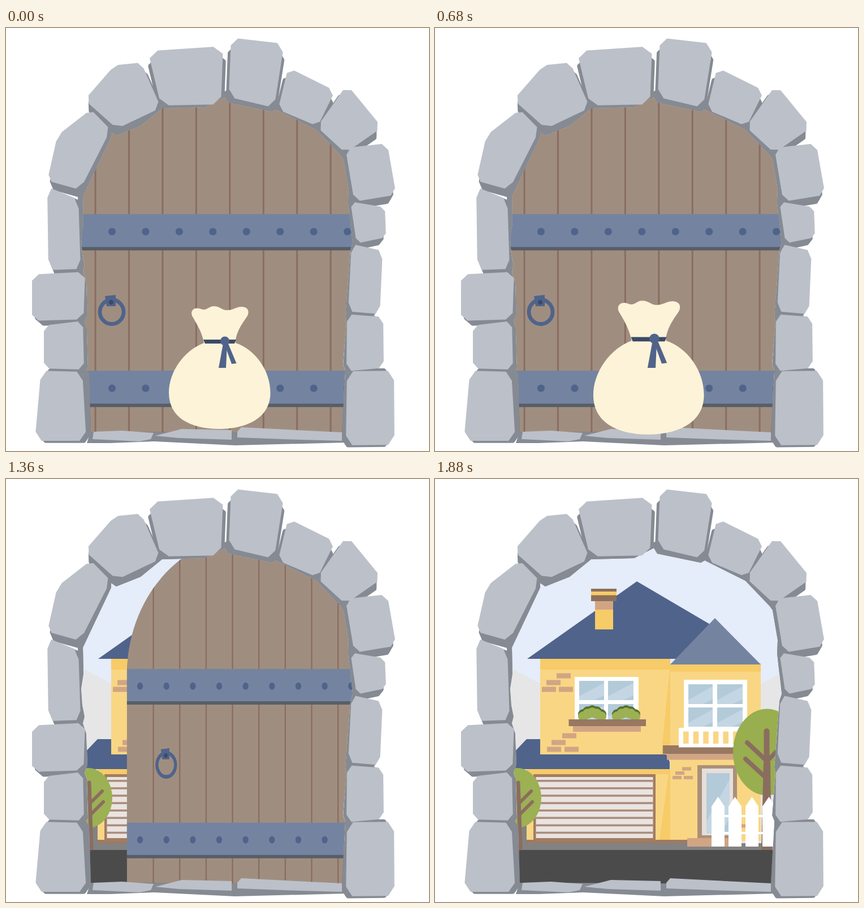
Animation, 748 px wide and 748 px high, one loop 1920 ms. Source, as an HTML page:

```html
<!DOCTYPE html>
<html>
<head>
<meta charset="utf-8">
<title>Door and bag</title>
<style>
html, body { margin: 0; height: 100%; overflow: hidden; background: #fff; }
svg { display: block; width: 100vw; height: 100vh; }
</style>
</head>
<body>
<svg id="stage" viewBox="0 0 748 748"></svg>
<script>
const navy = '#50638a', steel = '#7484a0', cream = '#fdf3d8', wall = '#f9d684', amber = '#f7cb68',
      tan = '#d1a584', brown = '#977861', bark = '#8b6d60', leaf = '#9bb153', white = '#fff',
      glass = '#b3cad9', shine = '#c4d6e3', stone = '#bcc0c9', shade = '#858a93';

const rect = (x, y, w, h, fill) => `<rect x="${x}" y="${y}" width="${w}" height="${h}" fill="${fill}"/>`;
const poly = (pts, fill, more = '') => `<polygon points="${pts}" fill="${fill}" ${more}/>`;
const path = (d, fill, more = '') => `<path d="${d}" fill="${fill}" ${more}/>`;
const oval = (x, y, rx, ry, fill) => `<ellipse cx="${x}" cy="${y}" rx="${rx}" ry="${ry}" fill="${fill}"/>`;
const line = (d, w, color) => path(d, 'none', `stroke="${color}" stroke-width="${w}" stroke-linecap="round"`);
const group = (id, body) => `<g id="${id}">${body}</g>`;
const times = (n, f) => Array.from({ length: n }, (_, i) => f(i)).join('');

const arch = 'M98 340A268 249 0 0 1 634 340V722H98Z';
const hole = 'M150 714L147 612 141 605 145 600 143 530 139 520 144 505 142 450 136 432 139 420 135 400 133 371 137 345 ' +
  '136 298 186 192 186 184 195 190 238 173 276 142 352 140 387 122 393 132 470 148 477 144 549 180 592 225 597 232 ' +
  '606 285 605 308 613 380 609 392 600 510 602 520 596 595 600 605 594 716Z';

// main corners of each block, clockwise round the arch
const blocks = [
  [62, 606, 135, 608, 142, 730, 51, 730],
  [67, 526, 136, 518, 138, 604, 67, 602],
  [46, 436, 140, 431, 137, 515, 46, 518],
  [73, 281, 128, 303, 132, 426, 75, 428],
  [73, 270, 91, 190, 150, 144, 185, 180, 131, 286],
  [139, 127, 192, 66, 239, 61, 274, 141, 196, 178],
  [251, 41, 384, 32, 380, 135, 274, 137],
  [398, 17, 492, 28, 474, 141, 394, 122],
  [499, 70, 582, 111, 551, 174, 481, 144],
  [603, 100, 665, 176, 600, 221, 550, 175],
  [600, 212, 674, 204, 690, 295, 616, 307],
  [609, 307, 670, 317, 672, 370, 620, 381],
  [611, 382, 666, 394, 661, 506, 605, 501],
  [603, 506, 667, 511, 668, 601, 602, 607],
  [603, 607, 686, 606, 687, 737, 601, 738]
];

// cuts every corner off a polygon
function chip(flat, cut = .13) {
  const n = flat.length / 2, at = i => flat.slice(i % n * 2, i % n * 2 + 2);
  return times(n, i => {
    const [ax, ay] = at(i), [bx, by] = at(i + 1), dx = (bx - ax) * cut, dy = (by - ay) * cut;
    return `${ax + dx},${ay + dy} ${bx - dx},${by - dy} `;
  });
}

// a block's dark side lies toward the middle of the arch and below
function blockShade(flat) {
  const dx = 372 - (flat[0] + flat[4]) / 2, dy = 470 - (flat[1] + flat[5]) / 2, k = 9 / Math.hypot(dx, dy);
  return poly(chip(flat), shade,
    `stroke="${shade}" stroke-width="8" stroke-linejoin="round" transform="translate(${dx * k} ${dy * k + 5})"`);
}

const backing = () => path(hole, shade, `stroke="${shade}" stroke-width="18"`) +
  poly('143,734 183,734 262,731 405,738 602,733 594,712 150,712', shade) + blocks.map(blockShade).join('');

const facing = () => blocks.map(b => poly(chip(b), stone)).join('') +
  poly('155,714 205,712 261,716 256,727 236,731 153,727', stone) +
  poly('264,721 311,709 399,711 399,728 305,725', stone) +
  poly('409,714 416,706 594,715 594,730 520,728 409,724', stone);

const bricks = (x, y, w, h, spots) => spots.map(([dx, dy]) => rect(x + dx, y + dy, w, h, tan)).join('');

function pane(x, y, w, h) {
  return rect(x, y, w, h, glass) +
    poly(`${x},${y + h} ${x},${y + h * .8} ${x + w},${y + h * .1} ${x + w},${y + h * .75} ${x + w * .6},${y + h}`, shine);
}

function bush(x) {
  const puffs = (dy, fill) => times(5, i => oval(x + 9 + i * 8, 416 - 7 * Math.sin(i * Math.PI / 4) + dy, 9, 9, fill));
  return puffs(0, '#56702f') + puffs(4, leaf);
}

function scene() {
  return path(hole, '#e5ecfa') +
    poly('98,316 185,361 576,362 634,333 634,660 98,660', '#e6e6e6') +
    // upper floor and roofs
    rect(186, 318, 230, 170, wall) + rect(186, 318, 230, 19, amber) +
    rect(416, 326, 160, 314, wall) + rect(416, 326, 160, 15, amber) +
    poly('416,328 416,487 400,487', amber) +
    poly('163,318 357,181 500,265 440,318', navy) +
    poly('416,328 495,246 576,328', steel) +
    rect(283, 216, 32, 50, amber) + rect(283, 216, 32, 15, tan) +
    rect(276, 194, 45, 22, '#8d705c') + rect(276, 199, 45, 6.5, amber) +
    bricks(189, 343.5, 25, 9, [[26, 0], [8, 12], [0, 24], [30, 24], [36, 106], [17, 118], [9, 130], [40, 130]]) +
    // windows
    rect(247, 350, 113, 76, white) + pane(255, 357, 44, 34) + pane(306, 357, 45, 34) +
    pane(255, 398, 44, 27) + pane(306, 398, 45, 27) + bush(253) + bush(313) +
    rect(236.5, 425, 136.5, 12, brown) + rect(244, 437, 120, 10, tan) +
    rect(440, 355, 112, 90, white) + pane(448, 363, 43, 35) + pane(499, 363, 45, 35) +
    pane(448, 404, 43, 34) + pane(499, 404, 45, 34) +
    // garage
    poly('140,483 162,460 186,460 186,487 409,487 415,500 415,513 140,513', navy) +
    rect(98, 600, 64, 50, '#828282') + rect(162, 513, 254, 126, wall) + rect(162, 513, 254, 9, amber) +
    poly('414,513 416,513 416,639 397,639', amber) +
    rect(162, 638, 285, 7, '#9d7a60') + rect(174, 522, 216, 118, '#a27c62') +
    rect(178.5, 527, 207, 108, '#eae3e0') + times(8, i => rect(178.5, 532 + i * 13.1, 207, 3.6, '#a98d7d')) +
    // balcony and entrance
    rect(410, 486, 140, 10.5, tan) + rect(403, 471, 157, 15, brown) +
    rect(431, 440, 120, 6.5, white) + rect(431, 468, 120, 6.5, white) +
    times(7, i => rect(431 + i * 17.6, 442, 8, 30, white)) +
    bricks(420, 509.5, 16, 6, [[17, 0], [5, 7.5], [0, 15.5], [20, 15.5], [121, 101]]) +
    rect(464, 506, 70, 130, '#ab907a') + rect(472, 512, 55, 118, '#e6dfd9') + pane(480, 520, 41, 107) +
    // ground
    rect(98, 644, 536, 13, '#828282') + rect(446, 635, 90, 15, tan) + rect(98, 656, 536, 66, '#4b4b4b') +
    // trees
    oval(145, 564, 43, 53, leaf) + line('M147 537L151 653', 7, bark) +
    line('M170 552L150 572M172 571L150 593', 6, bark) +
    oval(587, 483, 60, 76.5, '#98ae4f') + line('M586.5 446V520', 10, bark) +
    poly('581,500 593,500 595,656 577,656', bark) +
    line('M552 466L587 499L614 472M549 495L586 529', 8, bark) +
    // fence
    rect(490, 594, 112, 4, white) + rect(490, 624, 112, 4, white) +
    times(4, i => path(`M${489 + i * 30} 650v-71l11.5 -17l11.5 17v71z`, white));
}

function doorPanel() {
  const bar = y => rect(98, y, 536, 60, steel) + rect(98, y + 58.3, 536, 6, '#585e66') +
    times(9, i => oval(128 + i * 59.45, y + 31, 6.6, 6.6, navy));
  return `<g clip-path="url(#arch)">${path(arch, '#9f8e80')}` +
    times(8, i => rect(156.5 + i * 59.45, 90, 3, 632, bark)) + bar(329) + bar(606) + '</g>' +
    `<ellipse cx="187" cy="502" rx="21" ry="21.5" fill="none" stroke="${navy}" stroke-width="6.8"/>` +
    poly('175,474 194,472 194,492 178,492', navy) + oval(186, 485, 4, 4, '#3a4a68');
}

function bag() {
  return path('M349 552C345 535 336 521 329 509C325 497 336 493 345 497C355 501 358 492 367 492C379 492 381 499 391 499' +
    'C402 499 408 492 418 493C430 494 431 504 425 512C415 526 408 538 406 552V557C440 568 467.5 605 467.5 645' +
    'C467.5 690 425 709 377 709C325 709 288 688 288 645C288 608 315 570 350 557Z', cream) +
    poly('349,551 407,551 404,558 352,558', '#3b4a66') +
    poly('384,558 376,601 389,601 391,558', navy) + poly('386,558 399,594 407.5,593 392,556', navy) +
    oval(387, 553.5, 8, 8, navy);
}

function blast() {
  const tips = [[341, 525], [306, 588], [307, 660], [387, 684], [457, 681], [490, 606], [455, 537], [409, 538], [319, 558]];
  const dim = '#cfd6e2';
  const spikes = tips.map(([x, y]) => {
    const dx = x - 388, dy = y - 603, k = 9 / Math.hypot(dx, dy);
    return poly(`${x},${y} ${388 - dy * k},${603 + dx * k} ${388 + dy * k},${603 - dx * k}`, y > 606 ? dim : white);
  }).join('');
  const ring = (n, rx, ry, r, fill, from, sweep) => times(n, i => {
    const a = from + sweep * i / (n - 1), size = r + 3 * Math.sin(i * 5);
    return oval(388 + rx * Math.cos(a), 602 + ry * Math.sin(a), size, size, fill);
  });
  return spikes +
    ring(8, 36, 36, 13, dim, 0, Math.PI) + oval(388, 616, 38, 26, dim) +
    ring(8, 36, 32, 13, white, Math.PI, Math.PI) + oval(388, 594, 40, 26, white) +
    ring(4, 28, 27, 8, '#e6eaf1', .5, 2.1) +
    path('M335 516l4 -1l-1 7zM418 515l1 8l-8 8zM391 538l2 6l-4 7zM312 622l18 -8l-2 6zM355 652l6 6l8 0l-16 7zM454 636l5 4l-6 -1z', white);
}

const coinShape = '<g id="coin">' + path('M-24 -3L-23 5Q0 9 23 5L24 -3Z', '#f5b133') +
  path('M-24 -3Q-23 -6 0 -6Q23 -6 24 -3Q22 1 0 1Q-22 1 -24 -3Z', '#ffdb52') +
  path('M-15 -2.5h6M-4 -3.5h5M5 -1.5h4M12 -3h5', 'none', 'stroke="#eab541" stroke-width="1.3"') + '</g>';

// coin poses at 360 ms: x, y, tilt
const coins = [[227, 320, 17], [289.5, 380, -18], [456, 380, 18], [540, 356, -18], [339, 439, 4], [326, 461, 20],
  [373, 456, -86], [408, 456, 84], [436, 441, -4], [438, 455, -20], [371, 482, -25], [373, 486, 36]];
const mouth = [378, 512], fall = 300;

const flights = coins.flatMap(([x, y, tilt]) => {
  const dx = x - mouth[0], dy = y - mouth[1], dist = Math.hypot(dx, dy);
  const reach = Math.max(200, dist * 1.07);
  const start = 360 - fall * Math.sqrt(1 - dist / reach);
  const flight = { dx: dx * reach / dist, dy: dy * reach / dist, tilt, start };
  // outer coins also fly in an earlier wave
  return start > 265 ? [flight, { ...flight, start: start - 240 }] : [flight];
});

const stage = document.getElementById('stage');
stage.innerHTML = `<defs><clipPath id="arch"><path d="${arch}"/></clipPath>` +
  `<clipPath id="hole"><path d="${hole}"/></clipPath>${coinShape}</defs>` + backing() +
  `<g clip-path="url(#hole)">${scene()}${group('door', doorPanel())}</g>` + facing() +
  group('coins', '') + group('bag', bag()) + group('blast', blast());
const [door, coinLayer, sack, burst] = ['door', 'coins', 'bag', 'blast'].map(id => document.getElementById(id));

const clamp = v => Math.min(1, Math.max(0, v));
const show = (el, on) => el.setAttribute('display', on ? 'inline' : 'none');
const scaleAt = (el, x, y, sx, sy = sx) =>
  el.setAttribute('transform', `translate(${x} ${y}) scale(${sx} ${sy}) translate(${-x} ${-y})`);

function draw(t) {
  const swing = clamp((t - 1228) / 613);
  show(door, swing < 1);
  scaleAt(door, 634.5, 690, 1 - swing, 1 - .155 * swing ** 1.37);

  show(sack, t < 1040);
  scaleAt(sack, 377.5, 600.5, 1 + .27 * clamp((t - 520) / 480));

  coinLayer.innerHTML = flights.map(({ dx, dy, tilt, start }) => {
    const u = (t - start) / fall;
    if (u < 0 || u >= 1) return '';
    const far = 1 - u * u;
    return `<use href="#coin" transform="translate(${mouth[0] + dx * far} ${mouth[1] + dy * far}) rotate(${tilt})"/>`;
  }).join('');

  show(burst, t >= 960 && t < 1256);
  const size = t < 1040 ? .6 + 1.65 * clamp((t - 960) / 80) : 2.25 * (1 - (t - 1040) / 216);
  scaleAt(burst, 398, 640, Math.max(0, size));
  burst.setAttribute('opacity', 1 - clamp((t - 1040) / 235) ** 2);
}

const begin = performance.now();
function tick() {
  const t = (performance.now() - begin) % 1920;
  draw(Math.floor(t / 40) * 40);
  requestAnimationFrame(tick);
}
tick();
</script>
</body>
</html>
```
